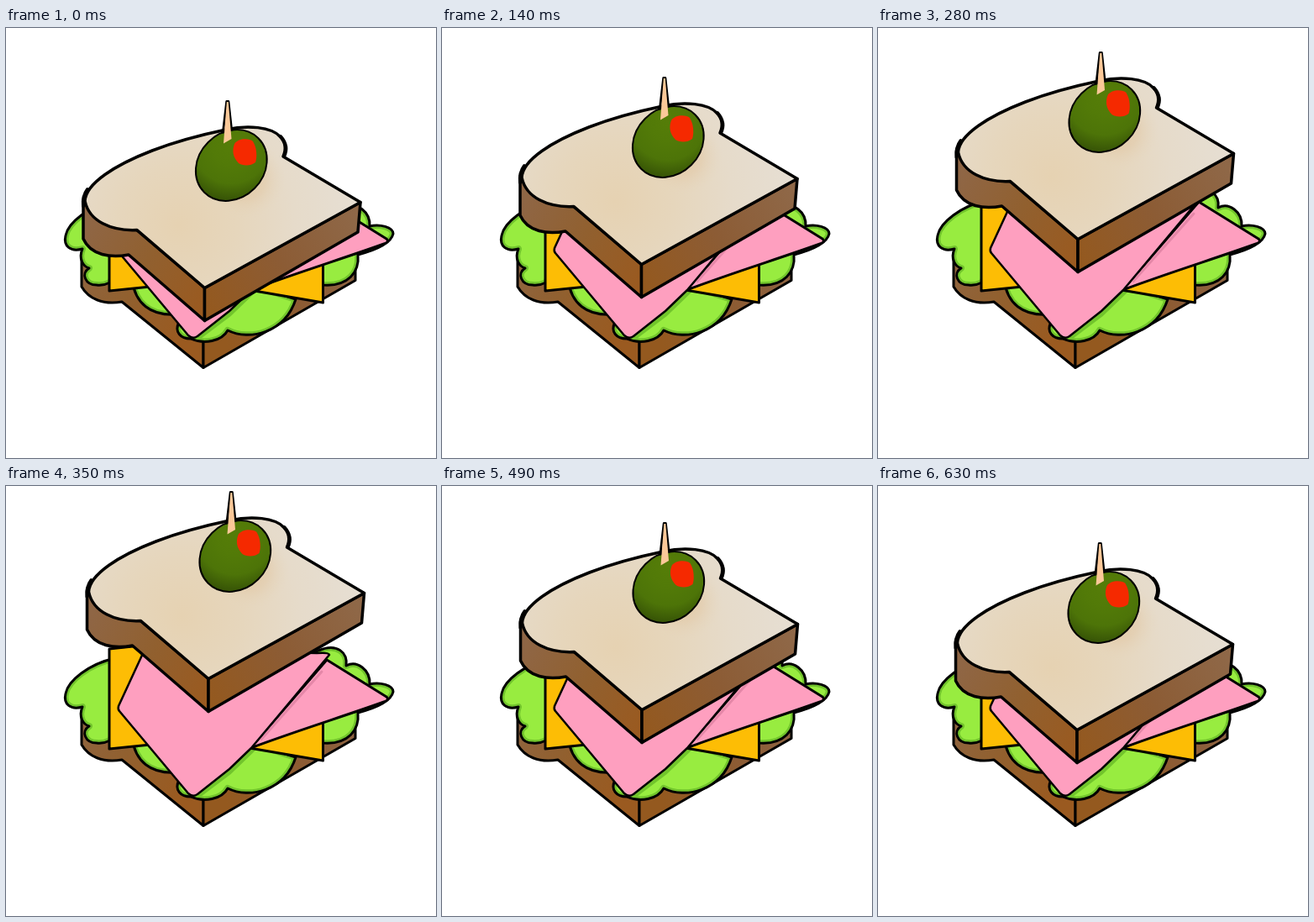
Write an HTML page with a canvas that moves like this. It is 512 px wide and 512 px high and loops after 0.7 s.

```html
<!DOCTYPE html>
<html lang="en">
<head>
<meta charset="utf-8">
<title>Sandwich</title>
<style>
html, body { margin: 0; height: 100%; overflow: hidden; background: #fff; }
canvas { display: block; width: 512px; height: 512px; }
</style>
</head>
<body>
<canvas id="stage" width="512" height="512"></canvas>
<script>
const ctx = document.getElementById('stage').getContext('2d');
ctx.lineJoin = ctx.lineCap = 'round';

const STEP = 70;
const LIFT = [0, 19, 28, 43, 58, 80];
const DRIFT = [0, 0.5, 1, 1.5, 1.5, 4.5];

function fade(gradient, colors) {
  colors.forEach((c, i) => gradient.addColorStop(i / (colors.length - 1), c));
  return gradient;
}
const linear = (x1, y1, x2, y2, ...colors) => fade(ctx.createLinearGradient(x1, y1, x2, y2), colors);
const radial = (x, y, r, ...colors) => fade(ctx.createRadialGradient(x, y, 0, x, y, r), colors);

function line(d, width = 3, color = '#000') {
  ctx.lineWidth = width;
  ctx.strokeStyle = color;
  ctx.stroke(new Path2D(d));
}

function shape(d, fill, width = 3) {
  ctx.fillStyle = fill;
  ctx.fill(new Path2D(d));
  if (width) line(d, width);
}

// Lettuce with a darker rim kept inside its outline
function leaf(d, fold) {
  shape(d, '#98ec40', 0);
  ctx.save();
  ctx.clip(new Path2D(d));
  line(d, 8, '#72c52c');
  if (fold) line(fold, 8, '#72c52c');
  ctx.restore();
  line(d);
}

const crustLeft = linear(92, 240, 236, 330, '#8f6645', '#91602f', '#9a5a20');
const crustRight = linear(236, 330, 420, 225, '#94591f', '#8c5c35', '#8f6848');
const crumb = radial(205, 235, 210, '#e6d2b2', '#e6d6bc', '#e6dbca', '#e6ded2');
const oliveSkin = radial(268, 140, 68, '#557d08', '#527a08', '#4d7408', '#345006');
const oliveGlow = radial(285, 180, 48, 'rgba(222,190,145,.6)', 'rgba(226,200,165,.5)', 'rgba(230,215,190,0)');

function drawBase() {
  shape('M90 275V308C98 322 115 330 138 326L235 404.5V330L150 290Z', crustLeft);
  shape('M235 404.5L416 300.5V280L235 340Z', crustRight);

  leaf('M130 205C98 212 74 232 71 247C68 260 77 267 91 263C86 275 92 284 99 286C89 292 94 306 108 306Q116 307 124 303L150 250Z');
  leaf('M150 300C154 328 172 343 203 341L200 305Z');
  leaf('M372 196C395 186 407 199 405 214C418 207 434 219 433 236C445 233 461 237 461 245C459 254 446 263 419 270C421 290 408 308 378 306L340 290L340 210Z');
  leaf('M206 350C200 362 208 370 220 370C236 377 257 373 264 360C290 373 332 363 345 323L292 306L222 362Z',
    'M224 371L265 340L293 313');

  shape('M123 194L160 190L190 230L172 308L123 313Z', '#fdbd05');
  shape('M290 312L377.5 276V327Z', '#fdbd05');

  const ham = '#fe9fbf';
  shape('M291 312L382 207L453 251Q457 255 450 257C400 275 350 290 291 312Z', ham);
  line('M304 301.5L376 221', 3, '#e587a8');
  shape('M165 195L134 262Q133 266 135 268L217 366Q222 371 228 367L266 337L292 312L385 201Q384 198 370 199Z', ham, 2.5);
}

function drawOlive() {
  ctx.fillStyle = oliveGlow;
  ctx.beginPath();
  ctx.arc(285, 180, 48, 0, 7);
  ctx.fill();

  ctx.beginPath();
  ctx.ellipse(268.3, 163.5, 45.5, 39, -Math.PI / 4, 0, 7);
  ctx.fillStyle = oliveSkin;
  ctx.fill();
  ctx.lineWidth = 2;
  ctx.strokeStyle = '#000';
  ctx.stroke();

  shape('M272 138C276 131 290 131 294 135C299 143 299 154 297 160C291 165 281 164 277 161C270 154 269 146 272 138Z', '#f52900', 0);
  line('M258.5 124L262.8 87.5H264.8L268.5 121');
  shape('M262.8 88H264.8L268.5 132L259 137.5Z', '#fbc898', 0);
}

function drawTop() {
  shape('M92 204V251C101 271 125 274 146 270L236.5 348.5V309.5L155 240Z', crustLeft, 3.5);
  shape('M236.5 348.5L419 243L422 207.5L236.5 309.5Z', crustRight, 3.5);
  shape('M94 206C95 185 130 163 174 146C205 134 238 126 262 121C288 115 316 118 326 129C333 136 334 144 330 153L422 207.5L236.5 309.5L156 240.5C125 242 99 230 94 206Z', crumb, 3.5);
  line('M92 212C91 202 94 196 97 192M327 129C335 138 334 147 331 153', 4);
  drawOlive();
}

function frame() {
  const step = Math.floor(performance.now() / STEP) % 10;
  const pose = Math.min(step, 10 - step);
  ctx.clearRect(0, 0, 512, 512);
  drawBase();
  ctx.save();
  ctx.translate(DRIFT[pose], -LIFT[pose]);
  drawTop();
  ctx.restore();
  requestAnimationFrame(frame);
}
frame();
</script>
</body>
</html>
```
